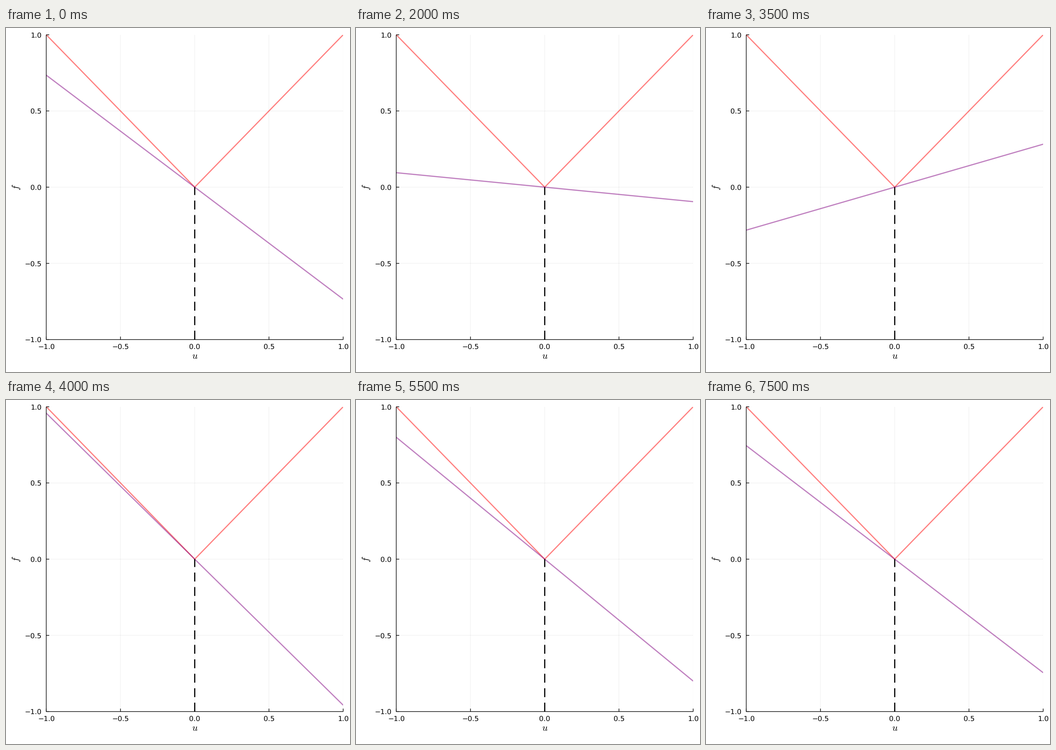
A matplotlib script for the animation above (8000 ms loop, 748 by 748 pixels).

```python
import matplotlib.pyplot as plt
from matplotlib.animation import FuncAnimation

SIZE, DPI = 748, 64
PX = 72 / DPI  # points per pixel
LEFT, RIGHT, TOP, BOTTOM = 87.5, 733.2, 14.7, 677.5
TICKS = [-1, -0.5, 0, 0.5, 1]
TICK_X = 6.5 * 2 / (RIGHT - LEFT)  # tick lengths in data units
TICK_Y = 6.5 * 2 / (BOTTOM - TOP)

# Slope of the line through the kink, one per step
SLOPES = [-0.735, 0.42, 0.8, -0.212, -0.095, 0.918, -0.15, 0.282,
          -0.958, 0.30, 0.617, -0.8, 0.327, -0.031, 0.932, -0.745]

plt.rcParams.update({"font.family": "DejaVu Sans", "mathtext.fontset": "cm",
                     "text.hinting": "none"})

fig = plt.figure(figsize=(SIZE / DPI, SIZE / DPI), dpi=DPI, facecolor="white")
ax = fig.add_axes([LEFT / SIZE, 1 - BOTTOM / SIZE,
                   (RIGHT - LEFT) / SIZE, (BOTTOM - TOP) / SIZE])
ax.set(xlim=(-1, 1), ylim=(-1, 1), xticks=TICKS, yticks=TICKS)
ax.set_axisbelow(True)
ax.grid(color="black", alpha=0.1, linewidth=0.65 * PX, snap=False)
ax.spines[:].set_visible(False)
ax.tick_params(length=0, labelsize=15.2 * PX)
ax.tick_params(axis="x", pad=8.6 * PX)
ax.tick_params(axis="y", pad=10 * PX)


def label(x, y, text, **kw):
    fig.text(x / SIZE, 1 - y / SIZE, text, fontsize=21 * PX,
             ha="center", va="center", **kw)


def stroke(xs, ys, color="black", width=2.5, **kw):
    return ax.plot(xs, ys, color=color, linewidth=width * PX, snap=False,
                   solid_capstyle="butt", dash_capstyle="butt",
                   solid_joinstyle="miter", **kw)[0]


def axis_stroke(xs, ys):
    stroke(xs, ys, width=1.3, clip_on=False)


label(410.3, 712.7, "$u$")
label(23.5, 346.3, "$f$", rotation=90)

axis_stroke([-1, -1, 1], [1, -1, -1])
for t in TICKS:
    axis_stroke([t, t], [-1, -1 + TICK_Y])
    axis_stroke([-1, -1 + TICK_X], [t, t])

stroke([-1, 0, 1], [1, 0, 1], "red", alpha=0.5)
tangent = stroke([-1, 1], [0, 0], "purple", alpha=0.5)
DASH = 2.418 / 2.5
stroke([0, 0], [-1, 0], linestyle=(0, (8 * DASH, 5 * DASH)))


def update(i):
    tangent.set_ydata([-SLOPES[i], SLOPES[i]])
    return (tangent,)


anim = FuncAnimation(fig, update, frames=len(SLOPES), interval=500,
                     repeat=True, repeat_delay=0)
plt.show()
```
